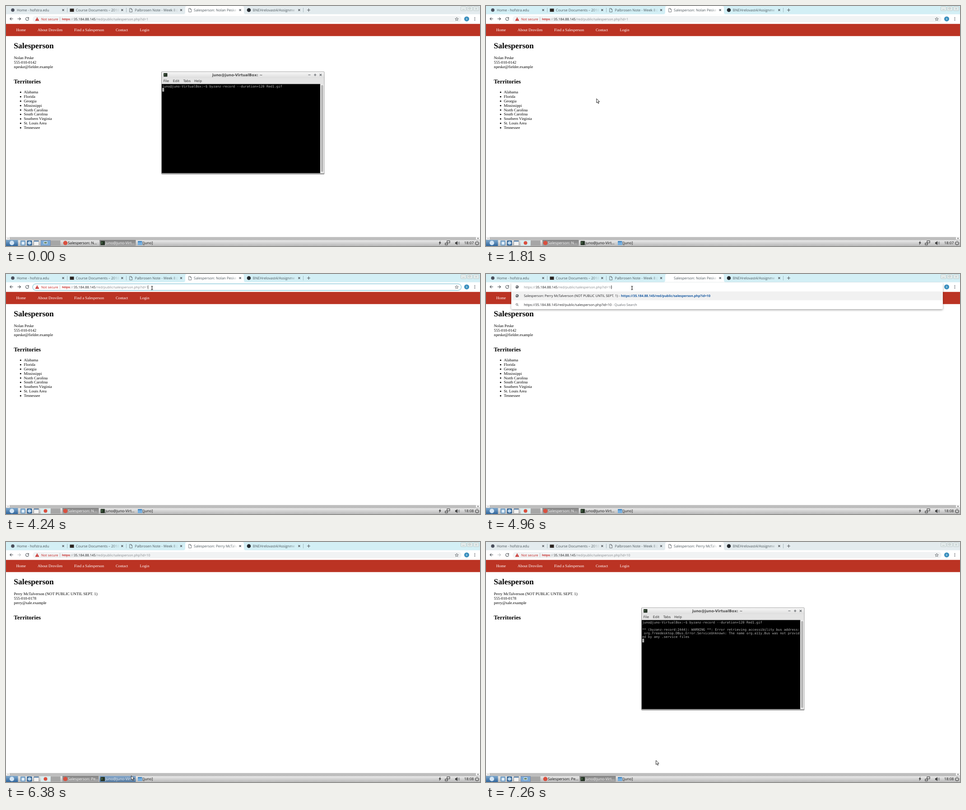
These frames come from a looping animation (1050 by 533 pixels, 7300 ms). An HTML page:

```html
<!DOCTYPE html>
<html lang="en">
<head>
<meta charset="utf-8">
<title>Browser session</title>
<style>
html, body { margin: 0; width: 100%; height: 100%; overflow: hidden; background: #fff; }
svg { display: block; width: 100vw; height: 100vh; text-rendering: geometricPrecision; }
text { white-space: pre; }
.ui { font: 7.45px "Open Sans", "Noto Sans", sans-serif; fill: #3c4043; }
.tab { font-size: 7.9px; fill: #4b565b; }
.task { font-size: 8.3px; fill: #111; }
.lit { fill: #f4f4f4; }
.page { font: 8.75px "Liberation Serif", serif; fill: #000; }
.nav { fill: #fff; }
.h1 { font-size: 17.5px; font-weight: bold; }
.h2 { font-size: 13.1px; font-weight: bold; }
.menu { font: 7.4px "DejaVu Sans", sans-serif; fill: #333; }
.title { font: bold 8.15px "DejaVu Sans", sans-serif; fill: #4a4a4a; text-anchor: middle; }
.mono { font: 7.26px "DejaVu Sans Mono", monospace; fill: #b2b2b2; }
.line { fill: none; stroke: #50555a; stroke-width: 1.1; }
.dim { fill: #85898d; }
.dark { fill: #202124; }
</style>
</head>
<body>
<svg id="stage" viewBox="0 0 1050 533" preserveAspectRatio="none">
  <defs>
    <linearGradient id="bar" x2="0" y2="1"><stop stop-color="#eee"/><stop offset="1" stop-color="#b9b9b9"/></linearGradient>
    <linearGradient id="pressed" x2="0" y2="1"><stop stop-color="#858585"/><stop offset="1" stop-color="#a5a5a5"/></linearGradient>
    <linearGradient id="hover" x2="0" y2="1"><stop stop-color="#86a9cd"/><stop offset="1" stop-color="#54799f"/></linearGradient>
    <linearGradient id="blue" x2="0" y2="1"><stop stop-color="#7fa9ce"/><stop offset="1" stop-color="#2f659c"/></linearGradient>
    <linearGradient id="frame" x2="0" y2="1"><stop stop-color="#f6f6f6"/><stop offset="1" stop-color="#dedede"/></linearGradient>
    <linearGradient id="fade"><stop offset=".84" stop-color="#fff"/><stop offset="1" stop-color="#000"/></linearGradient>
    <mask id="tabFade"><rect y="-12" width="97" height="18" fill="url(#fade)"/></mask>
    <filter id="shadow" x="-2%" y="-10%" width="104%" height="130%"><feDropShadow dx="0" dy="2" stdDeviation="2" flood-opacity=".35"/></filter>
  </defs>
</svg>
<script>
const LOOP = 7300;
const BEHIND = "1340-6970", FRONT = "0-1340 6970-7300";
const OLD = "0-5180", NEW = "5180-7300";

const at = on => on ? ` data-on="${on}"` : "";
const text = (x, y, cls, str, on) => `<text x="${x}" y="${y}" class="${cls}"${at(on)}>${str}</text>`;
const rect = (x, y, w, h, fill, r = 0, on, extra = "") =>
  `<rect x="${x}" y="${y}" width="${w}" height="${h}" rx="${r}" fill="${fill}" ${extra}${at(on)}/>`;
const dot = (x, y, r, fill, on) => `<circle cx="${x}" cy="${y}" r="${r}" fill="${fill}"${at(on)}/>`;
const line = (d, extra = "", on) => `<path class="line" d="${d}" ${extra}${at(on)}/>`;
const group = (on, ...parts) => `<g${at(on)}>${parts.join("")}</g>`;
const cross = (x, y, r) => line(`M${x - r} ${y - r}l${2 * r} ${2 * r}m0 ${-2 * r}l${-2 * r} ${2 * r}`);

function page() {
  const nav = [[22.5, "Home"], [70, "About Drovilen"], [151, "Find a Salesperson"], [243, "Contact"], [296.5, "Login"]];
  const places = ["Alabama", "Florida", "Georgia", "Mississippi", "North Carolina", "South Carolina",
    "Southern Virginia", "St. Louis Area", "Tennessee"];
  const person = (on, ...rows) => group(on, ...rows.map((row, i) => text(17.5, 118 + i * 9.85, "page", row)));
  return rect(0, 39, 1050, 474, "#fff") + rect(0, 39.5, 1050, 27.3, "#bb3323") +
    nav.map(([x, name]) => text(x, 56.3, "page nav", name)).join("") +
    text(17.3, 94, "page h1", "Salesperson") + text(17.3, 172.2, "page h2", "Territories") +
    person(OLD, "Nolan Peske", "555-010-0142", "npeske@fielder.example") +
    person(NEW, "Perry McTalverson (NOT PUBLIC UNTIL SEPT. 1)", "555-010-0178", "perry@sale.example") +
    group(OLD, ...places.map((name, i) =>
      dot(32.3, 191.6 + i * 9.85, 1.5, "#000") + text(39.5, 194.2 + i * 9.85, "page", name)));
}

function tabs() {
  const titles = ["Home - hofstra.edu", "Course Documents – 2018", "Palbrosen Note - Week 8 (", null, "BNEHrelovast4/Assignme"];
  const doc = (x, on) => group(on, line(`M${x - 2.7} 5.3h3.4l2.2 2.2v5.8h-5.6zM${x + .7} 5.3v2.2h2.2`, 'style="stroke-width:.8"'));
  const title = (x, str, on) => `<g transform="translate(${x} 11.8)" mask="url(#tabFade)">${text(0, 0, "ui tab", str, on)}</g>`;
  const strip = titles.map((str, i) => {
    const x = 24 + 130.7 * i;
    const label = str ? title(x, str)
      : title(x, "Salesperson: Nolan Peske", OLD) + title(x, "Salesperson: Perry McTalv", NEW);
    return label + cross(x + 102.6, 9, 2);
  }).join("");
  const separators = [135.5, 266, 658].map(x => rect(x, 4, .7, 10, "#8fa3aa")).join("");
  const buttons = [1007.5, 1021.5, 1035.5].map(x =>
    rect(x, 1.5, 12, 9, "#e4ecec", 1, null, 'stroke="#b4c0c0" stroke-width=".7"')).join("");
  return rect(0, 0, 1050, 18.5, "#e3ebee") + rect(0, 0, 1050, 18.5, "#d3eff5", 0, BEHIND) +
    '<path fill="#fff" d="M392 18.6q5 0 5-5V4q0-4 4-4H523q4 0 4 4v9.6q0 5 5 5z"/>' + separators + strip +
    dot(15, 9, 3.8, "#4a4f5c") + rect(141.5, 5.8, 9, 7, "#2b2420") + doc(276.5) +
    doc(407.5, "0-4900 5240-7300") + dot(538, 9, 4.3, "#24292e") +
    line("M667 9h7M670.5 5.5v7") + buttons +
    line("M1011 7.5h5M1025 4h4v3h-4zM1039.500 4l4 4m0-4l-4 4", 'style="stroke:#a9b5b5;stroke-width:.8"');
}

function url(x, id, { struck = true, plain = false } = {}) {
  const color = plain ? "dark" : "dim";
  const scheme = struck
    ? `<tspan text-decoration="line-through" ${plain ? 'class="dark"' : 'fill="#c5221f"'}>https</tspan><tspan class="${color}">://</tspan>`
    : `<tspan class="${color}">https://</tspan>`;
  return `<text x="${x}" y="31.500" class="ui">${scheme}<tspan x="${x + 26}" class="dark">35.184.88.145</tspan>` +
    `<tspan x="${x + 75}" class="${color}">/red/public/salesperson.php?id=${id}</tspan></text>`;
}

function globe(y) {
  return dot(69, y, 3.5, "#5f6368") + `<path d="M66 ${y - 1}l3 1 1-2m0 5l2-2" stroke="#fff" fill="none"/>`;
}

function toolbar() {
  const ring = 'stroke="#62b5cb" stroke-width="1"';
  const address = "https://35.184.88.145/red/public/salesperson.php?id=10";
  const insecure = '<path d="M69 25l4.300 7.800h-8.600z" fill="#c5221f"/><path d="M69 27.600v2.500m0 .8v1" stroke="#fff"/>' +
    '<text x="78" y="31.500" class="ui" style="fill:#c5221f">Not secure</text>' + rect(119, 24.5, .7, 9, "#aaa");
  const forward = "M25.500 28.500h7m-3.200-3.200l3.200 3.200-3.200 3.200";
  const editing = "4670-5090";
  return rect(0, 18.5, 1050, 21, "#fff") +
    line("M15.800 28.500h-7m3.200-3.200l-3.200 3.200 3.200 3.200") +
    line(forward, "", OLD) + line(forward, 'style="stroke:#bdbfc1"', NEW) +
    line("M49.600 26.500a3.400 3.400 0 1 0 .8 2.400M50.300 25v2.500h-2.500") +
    rect(59, 22, 950, 14, "#f1f3f4", 7) +
    rect(59, 21.8, 949.5, 14.6, "#fff", 7.3, "2960-4670", ring) +
    insecure +
    rect(124, 25, 190, 8.6, "#bfdeee", 0, "2960-3250") +
    group("0-2960", url(124, 1)) + group("2960-3250", url(124, 1, { plain: true })) +
    group("3250-4670", url(124, 1)) + group("5090-7300", url(124, 10)) +
    rect(314.5, 25, .7, 8.6, "#222", 0, "3300-3750 4200-4670") +
    line("M998.500 25.300l1 2.500 2.700.2-2.100 1.700.7 2.600-2.300-1.400-2.300 1.400.7-2.600-2.100-1.700 2.700-.2z", 'style="stroke-width:.8"') +
    group(editing,
      rect(56, 19, 956, 59, "#fff", 3, null, 'filter="url(#shadow)"') + rect(56, 38.7, 956, 19.6, "#f1f1f1"),
      globe(28.7), globe(48.6), url(84, 10, { struck: false }), rect(277.6, 25, .7, 8.6, "#222"),
      '<text x="84" y="51.300" class="ui dark">Salesperson: Perry McTalverson (NOT PUBLIC UNTIL SEPT. 1) - ' +
        `<tspan x="299" font-weight="bold" font-size="7.2" fill="#1558a0">${address}</tspan></text>`,
      line("M70 69l2 2", 'style="stroke-width:.9"') + `<circle class="line" cx="68.400" cy="67.500" r="2" style="stroke-width:.9"/>`,
      `<text x="84" y="71" class="ui dark">${address}<tspan fill="#5f6368"> - Qualvo Search</tspan></text>`) +
    dot(1020.5, 28.7, 5.5, "#398ebd") + '<text x="1018.500" y="31" class="ui" style="fill:#e6f4fa;font-size:6px">B</text>' +
    [25.7, 28.7, 31.7].map(y => dot(1038.5, y, .9, "#50555a")).join("");
}

function terminal() {
  const prompt = "juno@juno-VirtualBox:~$ byzanz-record --duration=120 Red1.gif";
  const warning = ["** (byzanz-record:2444): WARNING **: Error retrieving accessibility bus address:",
    " org.freedesktop.DBus.Error.ServiceUnknown: The name org.a11y.Bus was not provid",
    "ed by any .service files"];
  const menu = [[348.800, "File"], [369.800, "Edit"], [392.800, "Tabs"], [417, "Help"]];
  return group(FRONT,
    rect(344.5, 146, 360.5, 227.5, "#d9d9d9", 1, null, 'stroke="#777" stroke-width=".8"'),
    rect(345, 146.5, 359.5, 13.5, "url(#frame)"), rect(345, 160, 359.5, 13.3, "#e4e4e4"),
    rect(349, 149, 8.5, 8, "#263426", 1), line("M350.500 151l2 1.500-2 1.500", 'style="stroke:#9c9;stroke-width:.7"'),
    text(512.5, 156, "title", "juno@juno-VirtualBox: ~"),
    line("M669.500 153h5M682 153h5.500m-2.750-2.750v5.500"), cross(697, 153, 2.2),
    ...menu.map(([x, name]) => text(x, 169.3, "menu", name)),
    rect(345, 173.3, 351, 198, "#000"), rect(696, 173.3, 8.5, 198, "#ededed"),
    rect(698, 175.5, 4.5, 193, "#b3b3b3", 2), rect(345, 371.3, 359.5, 1.8, "#a3a3a3"),
    text(345.7, 180.6, "mono", prompt),
    rect(346, 182, 4.2, 8.2, "#aaa", 0, "0-40"),
    group("40-7300", ...warning.map((row, i) => text(345.7, 197 + i * 8.2, "mono", row)), rect(346, 214.8, 4.2, 8.2, "#aaa")));
}

function taskbar() {
  const browser = (cls, on) => group(on,
    text(137, 529.3, cls, "Salesperson: N...", OLD), text(137, 529.3, cls, "Salesperson: Pe...", NEW));
  const shell = (cls, on) => text(220, 529.3, cls, "juno@juno-Virt...", on);
  const hovered = "6260-6970";
  return rect(0, 512.8, 1050, 6.4, "#f1f1f1") + rect(8, 513.2, 1033, 5.6, "#bdbdbd") +
    rect(8, 513.2, 1033, 5.6, "#a5a5a5", 0, "6180-6260") +
    '<path d="M5.300 514.300v3.400l-2.200-1.700z" fill="#aaa"/><path d="M1044.800 514.300v3.400l2.200-1.700z" fill="#333"/>' +
    rect(0, 519, 1050, 14, "url(#bar)") + rect(0, 519, 1050, .6, "#8a8a8a") +
    rect(0, 519.5, 26.5, 13.5, "url(#blue)") + dot(13, 526.3, 5, "#d5e6f5") +
    rect(32, 520.7, 11, 11.3, "#6f9cc4", 1) + rect(34.5, 523.5, 6.5, 6.5, "#dcebf7") +
    rect(46.5, 520.7, 11, 11.3, "#285d91", 1) + dot(52, 526.3, 3.8, "#b7d4ec") +
    rect(61.5, 520.7, 11.5, 11.3, "#f3f3f3", 1, null, 'stroke="#777" stroke-width=".7"') + rect(62, 521, 10.5, 2.5, "#668db4") +
    rect(77, 520.5, 21.5, 11.7, "#78a8d6", 0, FRONT, 'stroke="#557"  stroke-width=".5"') +
    rect(83.5, 523, 8, 5.5, "#f4f8fb", 0, FRONT) + rect(84.500, 524, 6, 3.5, "#62836c", 0, FRONT) +
    rect(77, 520.5, 21.5, 11.7, "#d9eef1", 0, BEHIND) + dot(87.5, 526.3, 4, "#d9503f", BEHIND) +
    rect(99, 520.5, 21.5, 11.7, "#a6a6a6") +
    rect(125, 519.6, 80.5, 13.4, "url(#pressed)", 1, BEHIND) +
    rect(207, 519.6, 80.5, 13.4, "url(#pressed)", 1, FRONT) +
    rect(207, 519.6, 80.5, 13.4, "url(#hover)", 1, hovered) +
    dot(131.5, 526.3, 4.8, "#d9503f") +
    rect(209.500, 521.7, 9.5, 9.3, "#263426", 1) + line("M211 524l2.500 2-2.500 2", 'style="stroke:#8c8;stroke-width:.8"') +
    rect(292, 522, 9.5, 9, "#3e82bd", 1) + rect(292, 524.5, 9.5, 6.5, "#75afe0", 1) +
    browser("ui task", FRONT) + browser("ui task lit", BEHIND) +
    shell("ui task lit", FRONT + " " + hovered) + shell("ui task", "1340-6260") +
    text(302.5, 529.3, "ui task", "[juno]") +
    '<path d="M962.500 521l-4 5.500h2.300l-1.300 4.500 4.500-6h-2.500z" fill="#333"/>' +
    line("M977 521.500h6v4.500h-6zM973 526.500h5v4h-5z", 'style="stroke:#333"') +
    '<path d="M995 524.500h2l3-2.500v9l-3-2.500h-2z" fill="#444"/>' +
    line("M1001.500 524q1.500 2.300 0 4.600M1003.500 523q2.200 3.400 0 6.800", 'style="stroke-width:.8"') +
    text(1015, 529.3, "ui task", "18:07", "0-2800") + text(1015, 529.3, "ui task", "18:08", "2800-7300") +
    line("M1041.200 523.500a3.800 3.800 0 1 0 4.600 0M1043.500 521.500v4.500", 'style="stroke:#333"');
}

const stage = document.getElementById("stage");
stage.insertAdjacentHTML("beforeend", page() + tabs() + toolbar() + terminal() + taskbar() +
  `<g id="pointer"><path data-on="560-2560 5450-7300" d="M0 0v9.200l2.100-1.900 1.500 3.500 1.600-.7-1.500-3.400h2.900z" fill="#fff" stroke="#111" stroke-width=".9"/>` +
  `<path data-on="2560-5450" d="M-2-4q2 0 2 1.200q0-1.200 2-1.200M0-3v6M-2 4q2 0 2-1.200q0 1.200 2 1.200" fill="none" stroke="#222" stroke-width="1.200"/></g>`);

// time, x, y
const path = [[560, 331, 237], [720, 287, 226], [900, 236, 210], [980, 225.5, 212], [1070, 244.5, 208],
  [1770, 244.5, 207], [1810, 245, 206], [2050, 218, 158], [2240, 206, 102], [2400, 243, 62], [2520, 301, 43],
  [2600, 319, 34], [2850, 334, 33], [2960, 335.700, 35], [3590, 335.700, 35], [3860, 328, 32],
  [4150, 328, 31.500], [4240, 323.500, 31], [5410, 323.500, 31], [5480, 296, 36], [5600, 226, 57], [5710, 190, 72],
  [5820, 196, 180], [5980, 225, 380], [6140, 252, 508], [6260, 268, 517], [6380, 277.500, 519], [6660, 272, 521],
  [6970, 272, 521], [7100, 312, 505], [7260, 376.500, 485], [LOOP, 376.500, 485]];

function pointerAt(t) {
  const i = path.findIndex(step => step[0] > t);
  if (i < 1) return path[0].slice(1);
  const [t0, x0, y0] = path[i - 1], [t1, x1, y1] = path[i];
  const k = (t - t0) / (t1 - t0);
  return [x0 + (x1 - x0) * k, y0 + (y1 - y0) * k];
}

const timed = [...stage.querySelectorAll("[data-on]")].map(el => ({
  el, spans: el.dataset.on.split(" ").map(span => span.split("-").map(Number))
}));
const pointer = document.getElementById("pointer");
const start = performance.now();

function render() {
  const t = Math.max(0, performance.now() - start) % LOOP;
  for (const { el, spans } of timed)
    el.style.display = spans.some(([from, to]) => t >= from && t < to) ? "" : "none";
  pointer.setAttribute("transform", `translate(${pointerAt(t)})`);
  requestAnimationFrame(render);
}
render();
</script>
</body>
</html>
```
